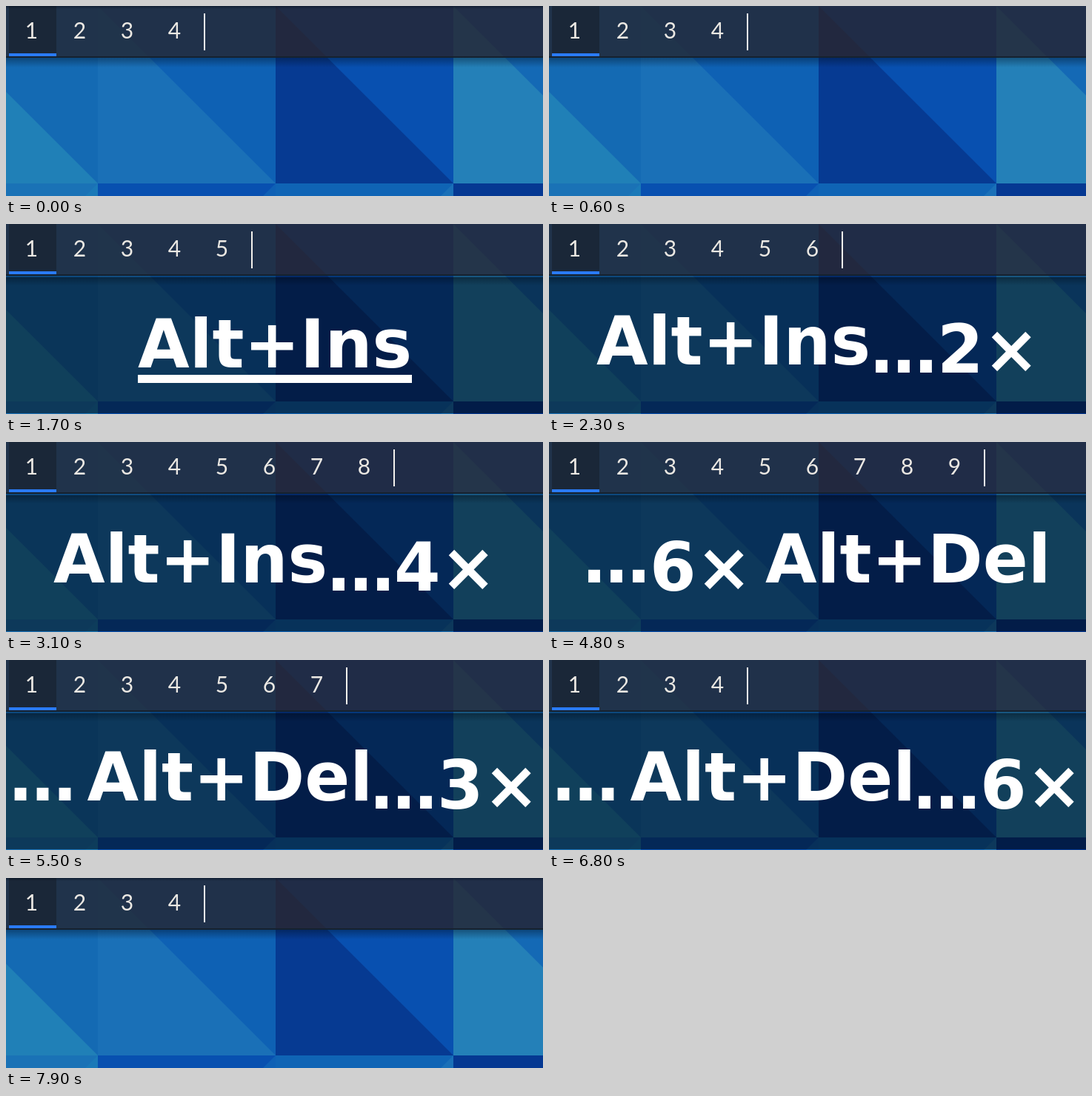
Recreate the animation shown at these times as an HTML page with a canvas. Size 725 by 257 pixels, loop 8 s.

```html
<!DOCTYPE html>
<html lang="en">
<head>
<meta charset="utf-8">
<title>Dynamic workspaces</title>
<style>
  html, body { margin: 0; width: 100%; height: 100%; overflow: hidden; background: #0a2c50; }
  canvas { display: block; width: 725px; height: 257px; }
</style>
</head>
<body>
<canvas id="stage" width="725" height="257"></canvas>
<script>
const ctx = document.getElementById('stage').getContext('2d');
const W = 725, H = 257, LOOP = 8000;
const BAR = 68, TILE = 240, CELL = 64;

const ADD = [1700, 2100, 2500, 2900, 3300, 3800];
const REMOVE = [4600, 5000, 5300, 5800, 6200, 6600];
const CLOSE = [4700, ...REMOVE.slice(1)];
const HOLD = 200, HIDE = 7300;

// left edge, lower-left colour, upper-right colour
const WALL = [
  [-116, '#2080b7', '#146ab3'],
  [124, '#1a70b7', '#0e61b4'],
  [364, '#063a92', '#0850b0'],
  [604, '#2480b8', '#1469b5']
];
const GLASS = [
  [-116, '#21364b', '#20334b'],
  [124, '#20344b', '#20314a'],
  [364, '#22283f', '#202c47'],
  [604, '#24354a', '#212f49']
];
// left edge, upper-left colour, lower-right colour
const NEXT_ROW = [
  [-116, '#1a72b6', '#1a79b8'],
  [124, '#0850b0', '#0e60b5'],
  [364, '#0f64b5', '#1a70b8'],
  [604, '#053892', '#0850b0']
];

function rect(color, x, y, w, h) {
  ctx.fillStyle = color;
  ctx.fillRect(x, y, w, h);
}

function triangle(color, ...p) {
  ctx.fillStyle = color;
  ctx.beginPath();
  ctx.moveTo(p[0], p[1]);
  ctx.lineTo(p[2], p[3]);
  ctx.lineTo(p[4], p[5]);
  ctx.fill();
}

function fade(y, h, alpha) {
  const g = ctx.createLinearGradient(0, y, 0, y + h);
  g.addColorStop(0, `rgba(0,10,25,${alpha})`);
  g.addColorStop(1, 'rgba(0,10,25,0)');
  rect(g, 0, y, W, h);
}

function tiles(list) {
  for (const [x, low, high] of list) {
    rect(high, x, 0, TILE, TILE);
    triangle(low, x, 0, x, TILE, x + TILE, TILE);
  }
}

function wallpaper() {
  tiles(WALL);
  for (const [x, left, right] of NEXT_ROW) {
    const r = x + TILE;
    rect(left, x, TILE, TILE, TILE);
    triangle(right, r, TILE, r, 2 * TILE, x, 2 * TILE);
  }
  fade(70, 13, 0.38);
}

function bar(count, topShade) {
  ctx.save();
  ctx.beginPath();
  ctx.rect(0, 0, W, BAR);
  ctx.clip();
  tiles(GLASS);
  ctx.restore();
  rect('#16222f', 0, BAR, W, 2);
  rect('#1a2738', 4, 0, CELL, 64);
  if (topShade) fade(0, 4, 0.45);
  rect('#2a7bf6', 4, 64, CELL, 4);

  ctx.font = '30px Lato, "Noto Sans CJK JP", sans-serif';
  ctx.textAlign = 'center';
  ctx.fillStyle = '#ebe8e3';
  for (let i = 0; i < count; i++) {
    ctx.fillText((i + 1) % 10, 35.5 + CELL * i - (i ? 0 : 1), 44);
  }
  rect('#f2f0ec', 11 + CELL * count, 10, 2, 50);
}

function label(text, x, base, width) {
  ctx.fillText(text, x, base);
  if (width) ctx.fillRect(x, base + 10, width, 11);
}

function keys(added, removed, recent) {
  rect('rgba(0,0,0,0.5)', 0, 72, W, 184);
  ctx.font = 'bold 90px "DejaVu Sans", sans-serif';
  ctx.textAlign = 'left';
  ctx.fillStyle = '#fff';
  const mark = w => recent ? w : 0;

  if (removed > 1) {
    label('…', 4.5, 190);
    label('Alt+Del', 109.5, 190);
    label(`…${removed}×`, 492, 200.5, mark(228));
  } else if (removed) {
    label('…', 46, 190);
    label('6×', 136, 200.5);
    label('Alt+Del', 292, 190, mark(386));
  } else if (added > 1) {
    label('Alt+Ins', 64, 190);
    label(`…${added}×`, 434, 200.5, mark(228));
  } else {
    label('Alt+Ins', 178, 194, mark(370));
  }
}

function draw(t) {
  const past = list => list.filter(s => s <= t).length;
  const added = past(ADD), removed = past(REMOVE);
  const recent = [...ADD, ...REMOVE].some(s => t >= s && t < s + HOLD);
  wallpaper();
  if (added && t < HIDE) keys(added, removed, recent);
  bar(4 + added - past(CLOSE), t < 500 || t >= 7900);
}

function tick() {
  draw(performance.now() % LOOP);
  requestAnimationFrame(tick);
}
tick();
</script>
</body>
</html>
```
